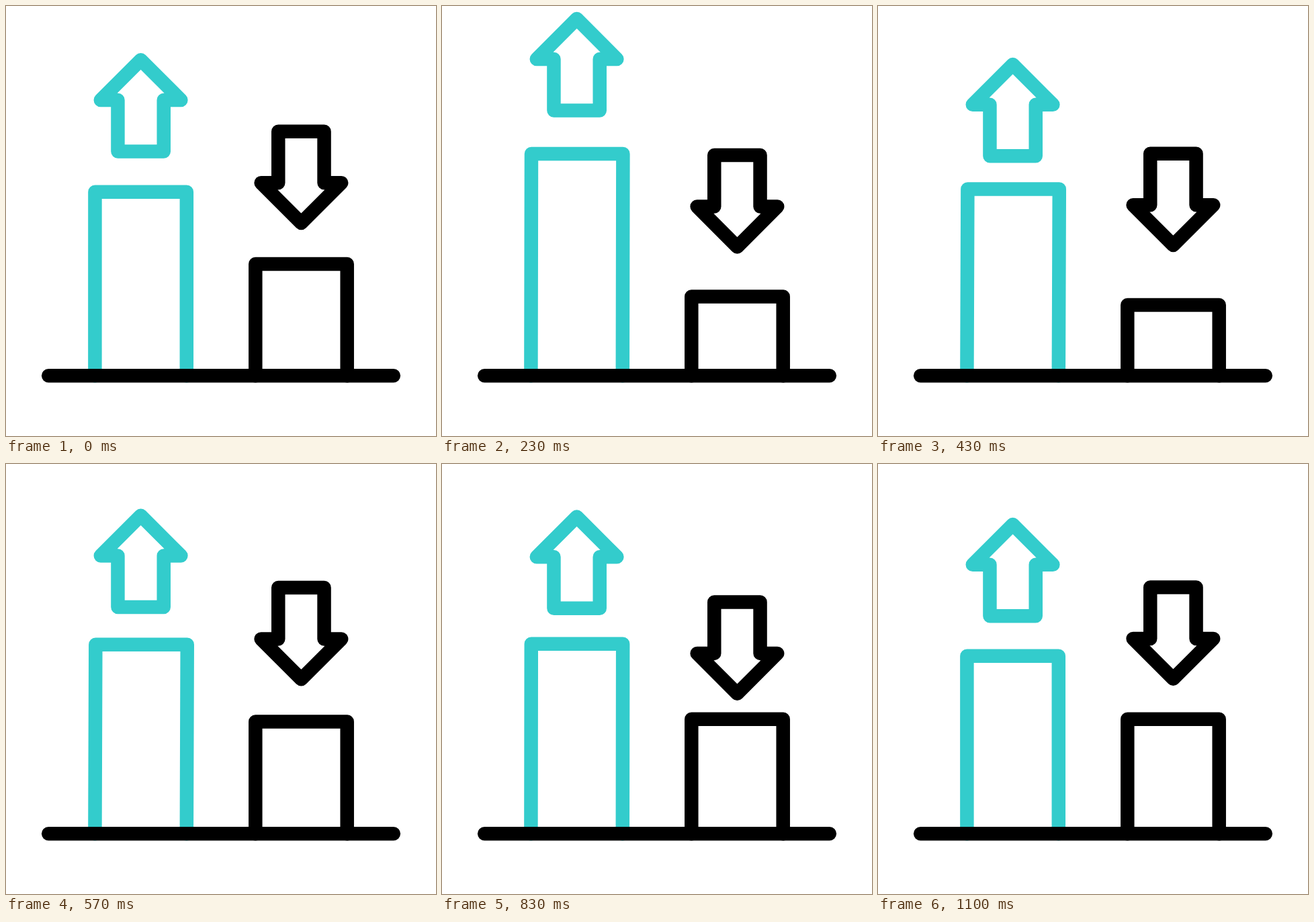
An HTML page that plays this animation: 640x640 px, repeating every 1.67 s.

```html
<!DOCTYPE html>
<html lang="en">
<head>
<meta charset="utf-8">
<title>Up and down bars</title>
<style>
  html, body { margin: 0; width: 100%; height: 100%; overflow: hidden; background: #fff; }
  svg { display: block; width: 100%; height: 100%; }
  path { fill: none; stroke-width: 20.5; stroke-linecap: round; stroke-linejoin: round; }
  .up { stroke: #3cc; }
  .down { stroke: #000; }
</style>
</head>
<body>
<svg viewBox="0 0 640 640">
  <path id="upBar" class="up"/>
  <path id="upArrow" class="up"/>
  <path id="downBar" class="down"/>
  <path id="downArrow" class="down"/>
  <path class="down" d="M63.2 550.2H576.8"/>
</svg>
<script>
const LOOP = 1670;
const BASE = 550.2;
const START = -2; // the first hop is already under way when the loop begins

const clamp = u => Math.min(1, Math.max(0, u));
const smooth = (a, b, s) => {
  const u = clamp((s - a) / (b - a));
  return u * u * (3 - 2 * u);
};

// Eases from 0 to 1 at the apex, rests there for `hold` steps, then eases back to 0.
const hop = (s, from, apex, to, hold = 0) =>
  smooth(from, apex, s) - smooth(apex + hold, to, s);

const setPath = (id, d) => document.getElementById(id).setAttribute("d", d);

// dir is 1 for an arrow pointing up, -1 for down; y is the wing line.
function arrow(id, x, y, dir) {
  const head = 59.8, shaft = 34.15;
  const tip = y - head * dir, tail = y + 76.5 * dir;
  setPath(id, `M${x} ${tip}L${x + head} ${y}H${x + shaft}V${tail}H${x - shaft}V${y}H${x - head}Z`);
}

function bar(id, x, top, lean = 0) {
  const w = 136.4;
  setPath(id, `M${x} ${BASE}L${x + lean} ${top}H${x + w + lean}L${x + w} ${BASE}`);
}

function draw(ms) {
  const s = Math.floor((ms / 10 + 0.5) * 0.3); // 30 steps per second

  const arrowRise = 71.5 * hop(s, START, 6.6, 13.9) + 24.5 * hop(s, 13.9, 19.8, 29.8);
  const barRise = 66.3 * hop(s, START, 6.6, 15.3) + 25.5 * hop(s, 11.5, 20.5, 33);
  const arrowDrop = 49 * hop(s, START, 10.8, 17.4) + 22.2 * hop(s, 17.4, 24.5, 31.5);
  const barDrop = 70 * hop(s, START, 11.3, 17.8, 0.8);

  arrow("upArrow", 200.6, 149.8 - arrowRise, 1);
  bar("upBar", 132.4, 285.8 - barRise, hop(s, START, 14, 33));
  arrow("downArrow", 439.4, 260 + arrowDrop, -1);
  bar("downBar", 371.3, 379.8 + barDrop);
}

const start = performance.now();
function tick() {
  draw((performance.now() - start) % LOOP);
  requestAnimationFrame(tick);
}
tick();
</script>
</body>
</html>
```
